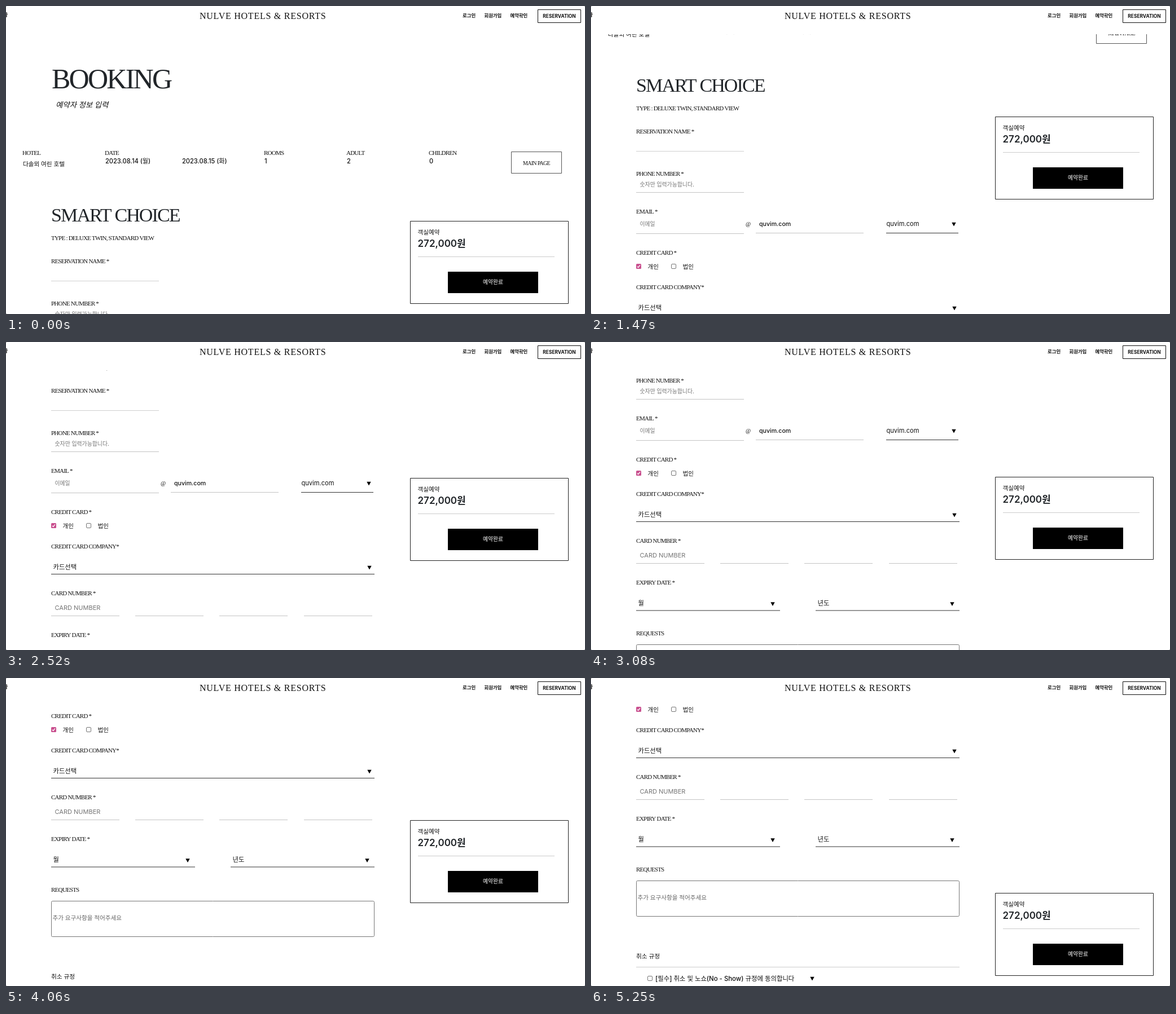
These frames come from a looping animation (1026 px wide and 546 px high, 5.46 s). An HTML page with a canvas:

```html
<!DOCTYPE html>
<html lang="ko">
<head>
<meta charset="utf-8">
<title>Booking</title>
<style>
  html, body { margin: 0; width: 100%; height: 100%; overflow: hidden; background: #fff; }
  canvas { display: block; width: 1026px; height: 546px; }
</style>
</head>
<body>
<canvas id="stage" width="1026" height="546"></canvas>
<script>
const W = 1026, H = 546, LOOP = 5460, STEP = 70, HEADER = 50;
const ctx = document.getElementById('stage').getContext('2d');
const SERIF = '"Liberation Serif", serif';
const SANS = 'Inter, "Noto Sans CJK KR", "Noto Sans CJK", sans-serif';
const INK = '#111', DARK = '#212529', HINT = '#757575', RULE = '#c4c4c4';

// Page scroll: [time, offset]
const SCROLL = [
  [630, 0], [700, 14], [770, 48], [840, 92], [910, 134], [980, 166], [1050, 188],
  [1190, 213], [1400, 228], [1750, 236], [1960, 242], [2310, 250],
  [2380, 266], [2450, 304], [2520, 366], [2590, 415], [2660, 441], [2730, 452],
  [2800, 457], [2870, 459], [3430, 459],
  [3500, 466], [3570, 478], [3640, 494], [3780, 535], [3990, 590], [4200, 620],
  [4400, 634], [4550, 638], [4830, 637], [5180, 637], [5250, 636]
];
// Summary card position in the document, trailing behind the scroll
const DRIFT = [
  [840, 381], [910, 383], [1190, 391], [1400, 412], [1750, 480], [1960, 533],
  [2310, 600], [2520, 607], [2870, 645]
];
const DRIFT_LATE = [[3640, 840], [4060, 852], [4300, 884], [4550, 936]];

function track(points, t) {
  if (t <= points[0][0]) return points[0][1];
  for (let i = 1; i < points.length; i++) {
    const [t0, v0] = points[i - 1], [t1, v1] = points[i];
    if (t <= t1) return v0 + (v1 - v0) * (t - t0) / (t1 - t0);
  }
  return points[points.length - 1][1];
}

function swing(t, start, duration, from, to) {
  const p = Math.min(1, Math.max(0, (t - start) / duration));
  return from + (to - from) * (0.5 - Math.cos(p * Math.PI) / 2);
}

function cardTop(t) {
  if (t < 2870) return track(DRIFT, t);
  if (t < 3640) return swing(t, 2870, 600, 645, 840);
  if (t < 4550) return track(DRIFT_LATE, t);
  const p = Math.min(1, (t - 4550) / 630);
  return 936 + 81 * Math.sin(p * Math.PI / 2);
}

// Text is placed by the vertical centre of its capitals.
function write(str, x, y, font, size, color, align, spacing) {
  ctx.font = font;
  ctx.fillStyle = color;
  ctx.textAlign = align;
  ctx.letterSpacing = spacing + 'px';
  ctx.fillText(str, x, y + size * 0.35);
}

function serif(str, x, y, size = 11, spacing = -0.07, color = INK, align = 'left') {
  write(str, x, y, `${size}px ${SERIF}`, size, color, align, spacing * size);
}

function sans(str, x, y, size, { weight = 500, color = INK, align = 'left', style = '' } = {}) {
  write(str, x, y, `${style} ${weight} ${size}px ${SANS}`, size, color, align, 0);
}

function rule(x0, x1, y, color = RULE) {
  ctx.fillStyle = color;
  ctx.fillRect(x0, y, x1 - x0, 1);
}

function frame(x, y, w, h, color, radius = 0) {
  ctx.strokeStyle = color;
  ctx.lineWidth = 1;
  ctx.beginPath();
  ctx.roundRect(x + 0.5, y + 0.5, w - 1, h - 1, radius);
  ctx.stroke();
}

function arrow(x, y) {
  ctx.fillStyle = '#000';
  ctx.beginPath();
  ctx.moveTo(x - 3.7, y - 3.3);
  ctx.lineTo(x + 3.7, y - 3.3);
  ctx.lineTo(x, y + 3.5);
  ctx.fill();
}

function checkbox(x, y, checked) {
  if (!checked) return frame(x, y, 9, 9, '#767676', 1.5);
  ctx.fillStyle = '#c9508f';
  ctx.beginPath();
  ctx.roundRect(x, y, 9, 9, 1.5);
  ctx.fill();
  ctx.strokeStyle = '#fff';
  ctx.lineWidth = 1.3;
  ctx.beginPath();
  ctx.moveTo(x + 2, y + 4.7);
  ctx.lineTo(x + 3.7, y + 6.5);
  ctx.lineTo(x + 7, y + 2.3);
  ctx.stroke();
}

function select(str, x0, x1, y, arrowX) {
  sans(str, x0 + 3.5, y, 11.3);
  arrow(arrowX, y + 1);
  rule(x0, x1, y + 12, '#333');
}

function drawSummary() {
  serif('BOOKING', 81, 128.5, 50, -0.055, DARK);
  sans('예약자 정보 입력', 88, 175, 13.4, { style: 'italic' });

  [['HOTEL', 29], ['DATE', 175], ['ROOMS', 457], ['ADULT', 603], ['CHILDREN', 749]]
    .forEach(([label, x]) => serif(label, x, 260));
  sans('다솔뫼 여린 호텔', 30, 280, 10.6);
  [['2023.08.14 (월)', 176], ['2023.08.15 (화)', 312], ['1', 458], ['2', 604], ['0', 750]]
    .forEach(([value, x]) => sans(value, x, 275, 11.1));
  frame(895, 258, 90, 39, '#555');
  serif('MAIN PAGE', 940, 278, 10, -0.07, INK, 'center');
}

function drawForm() {
  serif('SMART CHOICE', 80, 370, 34, -0.055, DARK);
  serif('TYPE : DELUXE TWIN, STANDARD VIEW', 80, 411);

  serif('RESERVATION NAME *', 80, 452);
  rule(80, 271, 487, '#d0d0d0');

  serif('PHONE NUMBER *', 80, 527);
  sans('숫자만 입력가능합니다.', 86.5, 546.5, 9.9, { color: HINT });
  rule(80, 271, 560);

  serif('EMAIL *', 80, 594.5);
  sans('이메일', 86.5, 616.5, 9.8, { color: HINT });
  serif('@', 274, 616.5, 10);
  sans('quvim.com', 298, 616.5, 10.6);
  sans('quvim.com', 523.5, 616.5, 11.1, { weight: 400 });
  arrow(643, 617);
  rule(80, 271, 633);
  rule(292, 483, 632);
  rule(523, 651, 632, '#333');

  serif('CREDIT CARD *', 80, 667);
  checkbox(80, 687, true);
  sans('개인', 100.5, 692, 10.5);
  checkbox(142, 687, false);
  sans('법인', 162.5, 692, 10.5);

  serif('CREDIT CARD COMPANY*', 80, 728);
  select('카드선택', 80, 653, 765, 644);

  serif('CARD NUMBER *', 80, 811);
  sans('CARD NUMBER', 86.5, 837, 11, { weight: 400, color: HINT });
  for (let i = 0; i < 4; i++) rule(80 + Math.round(i * 149.2), 201 + Math.round(i * 149.2), 851);

  serif('EXPIRY DATE *', 80, 885);
  select('월', 80, 335, 922.5, 322);
  select('년도', 398, 653, 922.5, 640);

  serif('REQUESTS', 80, 975);
  frame(80, 995, 573, 64, '#767676', 2);
  sans('추가 요구사항을 적어주세요', 82.5, 1025.5, 10.6, { color: '#666' });

  sans('취소 규정', 80, 1129, 10.7);
  rule(80, 653, 1148, '#ccc');
  checkbox(100, 1164, false);
  sans('[필수] 취소 및 노쇼(No - Show) 규정에 동의합니다', 114, 1169, 11.4);
  arrow(392, 1169);
}

function drawCard(y) {
  ctx.fillStyle = '#fff';
  ctx.fillRect(716, y, 281, 147);
  frame(716, y, 281, 147, '#222');
  sans('객실예약', 729.5, y + 20, 10.6);
  sans('272,000원', 729.5, y + 40, 17, { weight: 600, color: DARK });
  rule(730, 972, y + 63, '#ccc');
  ctx.fillStyle = '#000';
  ctx.fillRect(783, y + 90, 160, 38);
  sans('예약완료', 863, y + 108.5, 9.8, { color: '#fff', align: 'center' });
}

function drawHeader() {
  const bold = { weight: 700 };
  sans('황', 3, 16, 9, { weight: 700, align: 'right' });
  serif('NULVE HOTELS & RESORTS', 343, 17, 16, 0.047);
  sans('로그인', 809, 17, 8.4, bold);
  sans('회원가입', 847.5, 17, 8.4, bold);
  sans('예약확인', 893.5, 17, 8.4, bold);
  frame(942, 6, 77, 24, '#111');
  sans('RESERVATION', 980.5, 18, 8.4, { weight: 700, align: 'center' });
  ctx.fillStyle = '#999';
  for (const x of [0, W - 1]) for (const y of [0, H - 1]) ctx.fillRect(x, y, 1, 1);
}

function render(now) {
  const t = Math.floor((now % LOOP) / STEP) * STEP;
  const scroll = Math.round(track(SCROLL, t));
  ctx.fillStyle = '#fff';
  ctx.fillRect(0, 0, W, H);
  ctx.save();
  ctx.beginPath();
  ctx.rect(0, HEADER, W, H - HEADER);
  ctx.clip();
  ctx.translate(0, -scroll);
  drawSummary();
  drawForm();
  drawCard(Math.round(cardTop(t)));
  ctx.restore();
  drawHeader();
}

const start = performance.now();
function tick() {
  render(performance.now() - start);
  requestAnimationFrame(tick);
}
tick();
</script>
</body>
</html>
```
